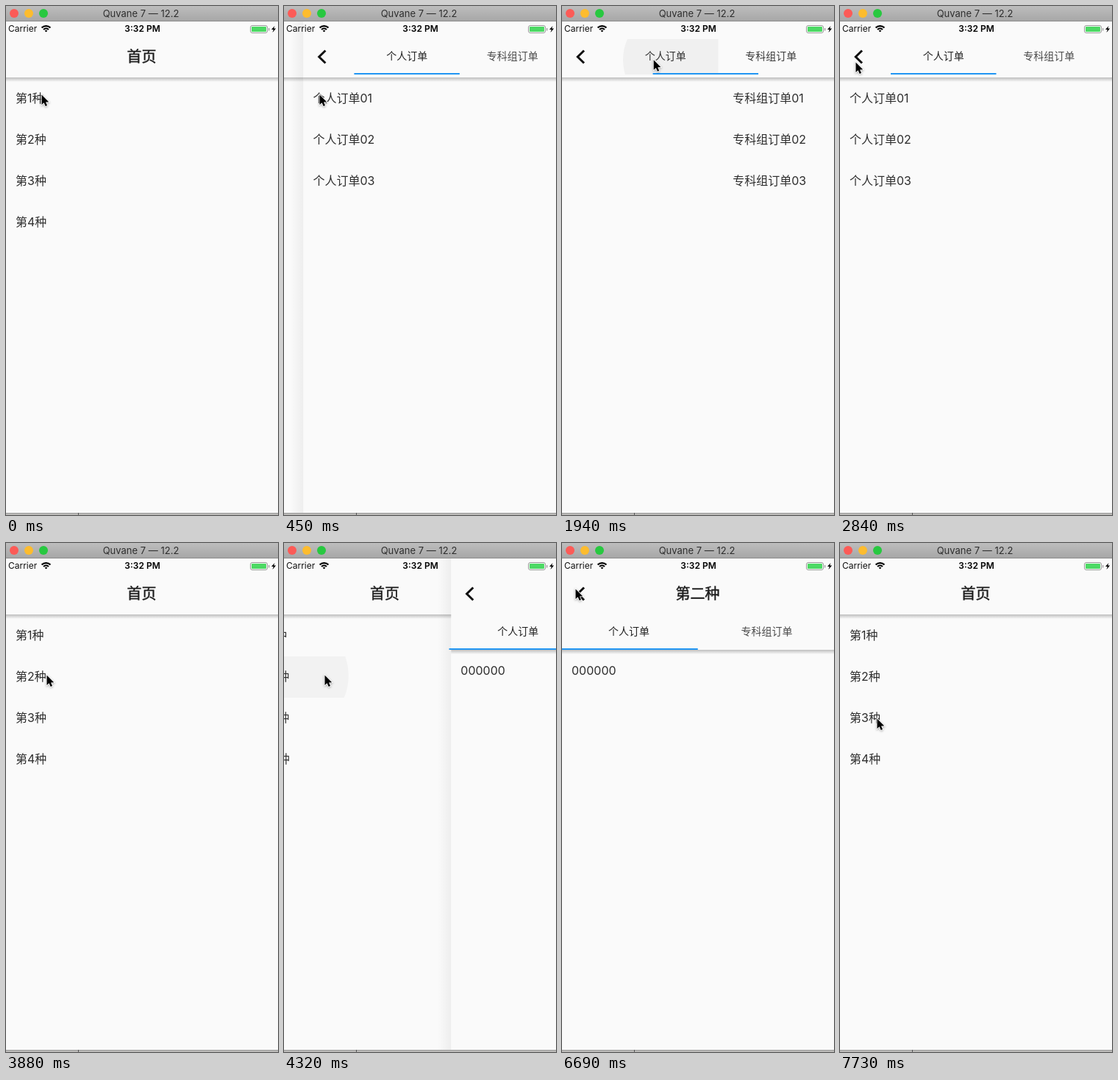
Animation, 370 px wide and 691 px high, one loop 8000 ms. Source, as an HTML page with a canvas:

```html
<!DOCTYPE html>
<html lang="zh-CN">
<head>
<meta charset="utf-8">
<style>
html, body { margin: 0; width: 100%; height: 100%; overflow: hidden; background: #fafafa; }
canvas { display: block; width: 370px; height: 691px; }
</style>
</head>
<body>
<canvas id="stage"></canvas>
<script>
const W = 370, H = 691, TOP = 21, BOTTOM = 688, ROW = 56;
const LOOP = 8000, TICK = 148.6;
const TRAVEL = 2.5, PUSH = 2.7, SCROLL = 2.02;   // durations in ticks
const BLUE = '#2196f3', PAPER = '#fafafa';

const canvas = document.getElementById('stage');
const ctx = canvas.getContext('2d');
const dpr = window.devicePixelRatio || 1;
canvas.width = W * dpr;
canvas.height = H * dpr;

// Each stop: when the cursor arrives, when it taps, and where
const stop = (arrive, tap, x, y) => ({ arrive, tap, x, y });
const row1 = stop(0, 1.2, 48, 120);
const firstRight = stop(6, 7.78, 295, 86);
const firstLeft = stop(11, 12.32, 150, 72);
const firstBack = stop(15, 21.2, 21, 76);
const row2 = stop(26, 28.2, 55, 179);
const secondRight = stop(32, 33.75, 266, 113);
const secondLeft = stop(37, 38.75, 111, 100);
const secondBack = stop(45, 47.2, 18, 62);
const row3 = stop(52, Infinity, 50, 238);
const route = [row1, firstRight, firstLeft, firstBack, row2, secondRight, secondLeft, secondBack, row3];

const clamp = v => Math.max(0, Math.min(1, v));

function bezier(x1, y1, x2, y2) {
  const at = (s, a, b) => 3 * a * s * (1 - s) ** 2 + 3 * b * s * s * (1 - s) + s ** 3;
  return x => {
    if (x <= 0 || x >= 1) return clamp(x);
    let lo = 0, hi = 1;
    for (let i = 0; i < 24; i++) {
      const mid = (lo + hi) / 2;
      if (at(mid, x1, x2) < x) lo = mid; else hi = mid;
    }
    return at(lo, y1, y2);
  };
}
const ease = bezier(.25, .1, .25, 1);
const easeOut = bezier(.35, .91, .33, .97);

// 0 -> 1 after one tap, back to 0 after another
const between = (n, go, back, curve, length) =>
  curve((n - go.tap) / length) - curve((n - back.tap) / length);
const pageShift = (n, open, close) => between(n - .4, open, close, easeOut, PUSH);
const tabShift = (n, right, left) => between(n, right, left, ease, SCROLL);

function rect(x, y, w, h, color) {
  ctx.fillStyle = color;
  ctx.fillRect(x, y, w, h);
}

function disc(x, y, r, color) {
  ctx.fillStyle = color;
  ctx.beginPath();
  ctx.arc(x, y, r, 0, 7);
  ctx.fill();
}

function pill(x, y, w, h, r) {
  ctx.beginPath();
  ctx.roundRect(x, y, w, h, r);
}

function shape(points, close = true) {
  ctx.beginPath();
  points.forEach(([x, y]) => ctx.lineTo(x, y));
  if (close) ctx.closePath();
}

function fill(color) {
  ctx.fillStyle = color;
  ctx.fill();
}

function stroke(color, width) {
  ctx.strokeStyle = color;
  ctx.lineWidth = width;
  ctx.stroke();
}

function fade(x0, y0, x1, y1, from, to) {
  const g = ctx.createLinearGradient(x0, y0, x1, y1);
  g.addColorStop(0, from);
  g.addColorStop(1, to);
  return g;
}

function text(str, x, y, size, { weight = 400, align = 'left', color = 'rgba(0,0,0,.82)' } = {}) {
  ctx.font = `${weight} ${size}px Inter, "Noto Sans CJK SC", "Noto Sans CJK", sans-serif`;
  ctx.textAlign = align;
  ctx.fillStyle = color;
  ctx.fillText(str, x, y);
}

function title(str) {
  text(str, 184.5, 76, 20, { weight: 500, align: 'center', color: '#1c1c1c' });
  // A hairline outline gives the CJK glyphs a medium weight
  ctx.strokeStyle = '#1c1c1c';
  ctx.lineWidth = .4;
  ctx.strokeText(str, 184.5, 76);
}

const rows = (x, count, label) => {
  for (let i = 1; i <= count; i++) text(label(i), x, 75 + ROW * i, 16);
};

function ripple(n, { tap, x, y }, left, top, width, height) {
  const age = n - tap;
  if (age < 0 || age > 1.3) return;
  ctx.save();
  ctx.beginPath();
  ctx.rect(left, top, width, height);
  ctx.clip();
  disc(x + 2, y + 1, 16 + 78 * age, `rgba(0,0,0,${.08 * (1 - age / 1.3)})`);
  ctx.restore();
}

function barShadow(y) {
  rect(0, y, W, 6, fade(0, y, 0, y + 6, 'rgba(0,0,0,.24)', 'rgba(0,0,0,0)'));
}

function backButton(n, tap) {
  ripple(n, tap, 0, 45, 50, 48);
  shape([[30, 60.5], [21.3, 69], [30, 77.5]], false);
  stroke('#111', 3);
}

// Two equal tabs meeting at `mid`
function tabs(n, mid, width, top, right, left, lead) {
  const p = tabShift(n + lead, right, left);
  ripple(n, right, mid, top, width, 48);
  ripple(n, left, mid - width, top, width, 48);
  ['个人订单', '专科组订单'].forEach((label, i) => {
    const selected = i ? p : 1 - p;
    const color = `rgba(0,0,0,${.7 + .17 * selected})`;
    text(label, mid + width * (i - .5), top + 28, 14, { align: 'center', color });
  });
  rect(mid + width * (p - 1), top + 46, width, 2, BLUE);
}

function home(n) {
  rect(0, TOP, W, BOTTOM - TOP, PAPER);
  barShadow(97);
  title('首页');
  ripple(n, row1, 0, 98, W, ROW);
  ripple(n, row2, 0, 98 + ROW, W, ROW);
  rows(13, 4, i => `第${i}种`);
}

function firstPage(n) {
  const scroll = W * tabShift(n, firstRight, firstLeft);
  barShadow(97);
  rows(13 - scroll, 3, i => `个人订单0${i}`);
  rows(W + 17 - scroll, 3, i => `专科组订单0${i}`);
  tabs(n, 212.5, 143.5, 45, firstRight, firstLeft, .045);
  backButton(n, firstBack);
}

function secondPage(n) {
  const scroll = W * tabShift(n, secondRight, secondLeft);
  barShadow(145);
  text('000000', 13 - scroll, 179, 16);
  text('111111', W + 13 - scroll, 179, 16);
  title('第二种');
  tabs(n, 184.75, 187.5, 97, secondRight, secondLeft, .8);
  backButton(n, secondBack);
}

function slideIn(draw, n, p) {
  if (p <= 0) return;
  ctx.save();
  ctx.translate(W * (1 - p), 0);
  rect(-18, TOP, 18, BOTTOM - TOP, fade(0, 0, -18, 0, 'rgba(0,0,0,.05)', 'rgba(0,0,0,0)'));
  rect(0, TOP, W, BOTTOM - TOP, PAPER);
  draw(n);
  ctx.restore();
}

function statusBar() {
  text('Carrier', 3, 35, 12, { color: '#111' });
  text('3:32 PM', 185.5, 35, 12, { weight: 600, align: 'center', color: '#000' });

  for (const r of [1.4, 4.9, 8.4]) {
    ctx.beginPath();
    ctx.arc(54.5, 35.5, r, -Math.PI * .75, -Math.PI * .25);
    stroke('#000', 2.2);
  }

  pill(332.5, 26.5, 23, 10, 2.5);
  stroke('#999', 1);
  pill(334, 28, 20, 7, 1);
  fill('#4cd964');
  rect(357, 30, 1.3, 3.5, '#999');
  shape([[365.5, 27], [361, 32], [363.8, 32], [362.5, 36], [367.2, 30.6], [364.3, 30.6]]);
  fill('#000');
}

function windowFrame() {
  rect(0, 0, W, 20, fade(0, 0, 0, 20, '#bdbdbd', '#a7a7a7'));
  rect(0, 20, W, 1, '#8e8e8e');
  ['#fc5b57', '#fdbc2e', '#28c840'].forEach((c, i) => disc(11 + 20 * i, 10, 6, c));
  text('Quvane 7 — 12.2', 183.5, 15, 13, { align: 'center', color: '#2e2e2e' });
  rect(0, BOTTOM, W, 3, fade(0, BOTTOM, 0, H, '#9c9c9c', '#c9c7c4'));
  rect(98, BOTTOM, 1, 3, '#555');
}

function cursor(n) {
  let { x, y } = row1;
  for (const s of route) {
    const p = clamp((n - s.arrive) / TRAVEL + 1);
    if (s === row1) continue;
    x += (s.x - x) * p;
    y += (s.y - y) * p;
  }
  ctx.save();
  ctx.translate(x, y);
  shape([[.5, .5], [.5, 14], [3.6, 11.2], [5.7, 16], [8, 15], [6, 10.4], [10.2, 10.2]]);
  ctx.shadowColor = 'rgba(0,0,0,.35)';
  ctx.shadowBlur = 3 * dpr;
  ctx.shadowOffsetY = dpr;
  stroke('#fff', 1.6);
  ctx.shadowColor = 'transparent';
  fill('#000');
  ctx.restore();
}

function render(now) {
  // The picture advances in even, held steps
  const n = Math.floor((now % LOOP) / TICK + .02);
  const first = pageShift(n, row1, firstBack);
  const second = pageShift(n, row2, secondBack);
  ctx.setTransform(dpr, 0, 0, dpr, 0, 0);
  rect(0, 0, W, H, PAPER);
  ctx.save();
  ctx.translate(-W / 3 * Math.max(first, second), 0);
  home(n);
  ctx.restore();
  slideIn(firstPage, n, first);
  slideIn(secondPage, n, second);
  statusBar();
  windowFrame();
  cursor(n);
}

const started = performance.now();
function loop() {
  render(performance.now() - started);
  requestAnimationFrame(loop);
}
loop();
</script>
</body>
</html>
```
